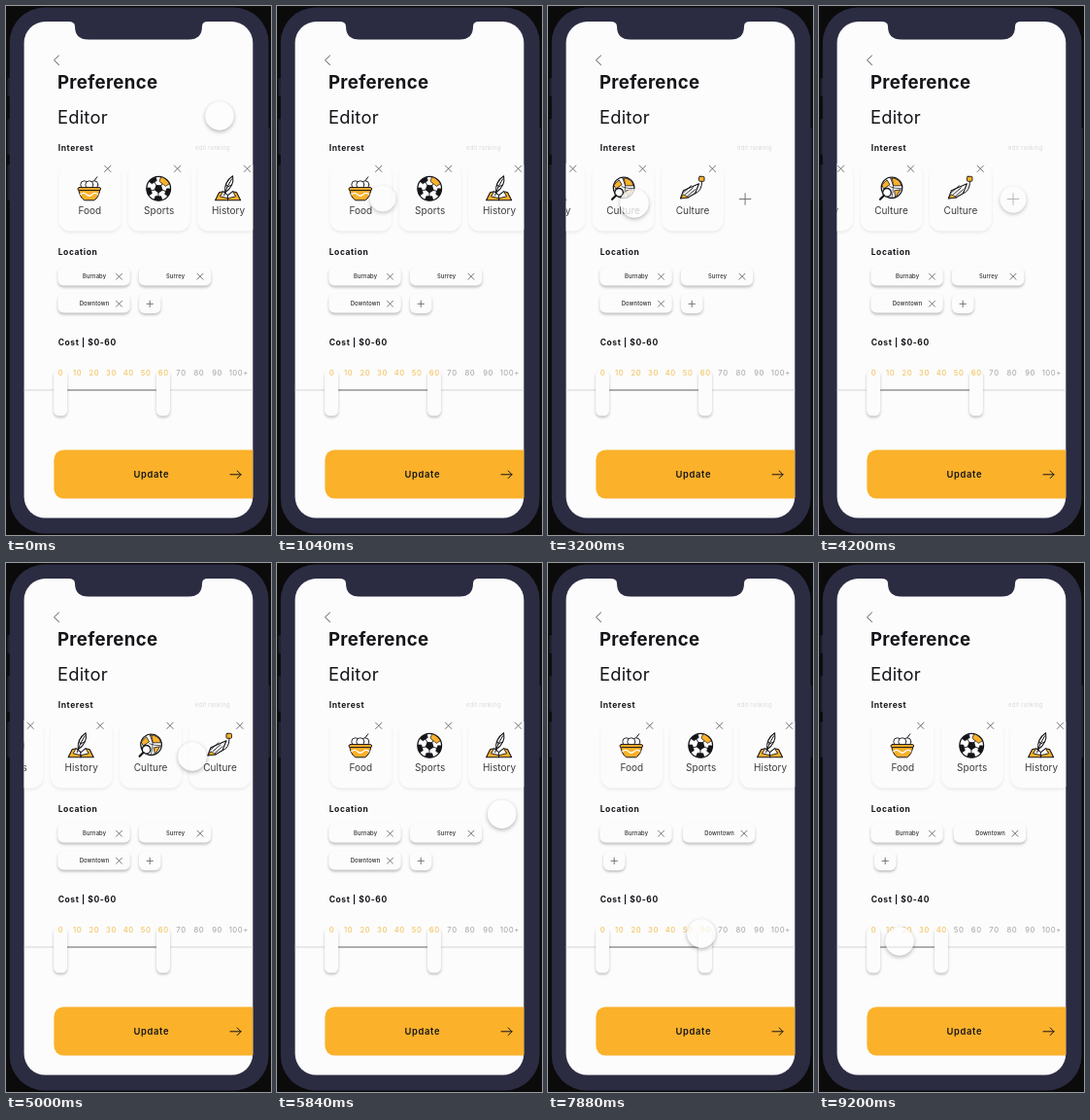
Write an HTML page with a canvas that moves like this. It is 273x544 px and loops after 9.24 s.

```html
<!DOCTYPE html>
<html lang="en">
<head>
<meta charset="utf-8">
<title>Preference editor</title>
<style>
html, body { margin: 0; width: 100%; height: 100%; overflow: hidden; background: #0b0b0c; }
canvas { display: block; width: 273px; height: 544px; }
</style>
</head>
<body>
<canvas id="stage"></canvas>
<script>
const W = 273, H = 544, LOOP = 9240, STEP = 40;
const INK = '#141419', ORANGE = '#fbb12a', BODY = '#2b2b42', PAPER = '#fcfcfc';
const canvas = document.getElementById('stage');
const c = canvas.getContext('2d');
const dpr = window.devicePixelRatio || 1;
canvas.width = W * dpr;
canvas.height = H * dpr;

const clamp = v => Math.max(0, Math.min(1, v));
const mix = (a, b, k) => a + (b - a) * k;
const ramp = (t, start, length) => {
  const v = clamp((t - start) / length);
  return v * v * (3 - 2 * v);
};

// Pointer stops and the time each is reached.
const STOPS = [
  { t: 0, x: 220, y: 113 },
  { t: 1000, x: 109, y: 198 },
  { t: 2300, x: 87, y: 203 },
  { t: 3900, x: 200, y: 199 },
  { t: 5800, x: 238, y: 254 },
  { t: 6400, x: 201, y: 279 },
  { t: 7800, x: 158, y: 381 },
  { t: 9160, x: 83, y: 389 }
];
const TRAVEL = 760;
const SWIPES = [1080, 2360, 4300];
const TAP = 6560, DRAG = 8400;

function pointerAt(t) {
  let { x, y } = STOPS[0];
  for (const stop of STOPS.slice(1)) {
    const k = ramp(t, stop.t - TRAVEL, TRAVEL);
    x = mix(x, stop.x, k);
    y = mix(y, stop.y, k);
  }
  for (const s of SWIPES) x -= 60 * Math.sin(Math.PI * ramp(t, s, 800));
  return { x, y };
}

const pressAt = t => Math.max(...[...SWIPES, TAP, DRAG].map(
  s => ramp(t, s - 240, 180) - ramp(t, s + 400, 180)));

const scrollAt = t =>
  -81 * ramp(t, 1080, 680) - 145 * ramp(t, 2360, 920) + 226 * ramp(t, 4700, 780);

function text(str, x, y, size, weight, color, spacing = 0, align = 'left') {
  c.font = `${weight} ${size}px Inter, sans-serif`;
  c.letterSpacing = spacing + 'px';
  c.textAlign = align;
  c.fillStyle = color;
  c.fillText(str, x + (align === 'center' ? spacing / 2 : 0), y);
}

function paint(path, fill, stroke, width = 1) {
  if (fill) { c.fillStyle = fill; c.fill(path); }
  if (stroke) { c.strokeStyle = stroke; c.lineWidth = width; c.stroke(path); }
}

const svg = (d, ...style) => paint(new Path2D(d), ...style);

function box(x, y, w, h, r, ...style) {
  const p = new Path2D();
  p.roundRect(x, y, w, h, r);
  paint(p, ...style);
}

function disc(x, y, r, ...style) {
  const p = new Path2D();
  p.arc(x, y, r, 0, Math.PI * 2);
  paint(p, ...style);
}

function polygon(x, y, r, sides, turn, ...style) {
  const p = new Path2D();
  for (let i = 0; i < sides; i++) {
    const a = turn + i * 2 * Math.PI / sides;
    p.lineTo(x + r * Math.cos(a), y + r * Math.sin(a));
  }
  p.closePath();
  paint(p, ...style);
}

function at(x, y, draw) {
  c.save();
  c.translate(x, y);
  draw();
  c.restore();
}

function shaded(alpha, blur, dy, draw) {
  c.save();
  c.shadowColor = `rgba(0,0,0,${alpha})`;
  c.shadowBlur = blur * dpr;
  c.shadowOffsetY = dy * dpr;
  draw();
  c.restore();
}

const cross = (x, y, r = 3.2) =>
  at(x, y, () => svg(`M${-r} ${-r}L${r} ${r}M${r} ${-r}L${-r} ${r}`, null, '#55555a', 0.8));
const plus = (x, y, r) =>
  at(x, y, () => svg(`M${-r} 0H${r}M0 ${-r}V${r}`, null, '#66666a', 0.9));

function foodIcon() {
  svg('M3 -5L8 -12', null, INK, 1);
  for (const x of [-5, 5, 0]) disc(x, -4, 4, '#fff', INK, 0.9);
  svg('M-11 1Q-10 9 -5 12H5Q10 9 11 1Z', ORANGE, INK, 1);
  box(-11.8, -1.2, 23.6, 3, 1.5, ORANGE, INK, 1);
  svg('M-9 6Q-6 3 -3 6T3 6T9 6', null, '#fff', 1.3);
}

function ballIcon() {
  c.save();
  disc(0, 0, 12.4, '#fff');
  const rim = new Path2D();
  rim.arc(0, 0, 12.4, 0, Math.PI * 2);
  c.clip(rim);
  for (let i = 0; i < 5; i++) {
    const a = -0.9 + i * 2 * Math.PI / 5, x = Math.cos(a), y = Math.sin(a);
    svg(`M${x * 4} ${y * 4}L${x * 8} ${y * 8}`, null, INK, 0.9);
    polygon(x * 12, y * 12, i ? 5 : 7, 5, a, i ? INK : ORANGE, INK, 0.7);
  }
  polygon(0, 0, 4.6, 5, -0.9, INK);
  c.restore();
  disc(0, 0, 12.4, null, INK, 1.2);
}

function historyIcon() {
  for (const side of [-1, 1]) {
    c.save();
    c.scale(side, 1);
    svg('M0 12L13 12L9 4L5 3L0 7Z', ORANGE, INK, 1.1);
    svg('M0 10L8 8L5 3L0 7Z', '#fff', INK, 0.9);
    c.restore();
  }
  svg('M-3 4Q-4 -7 5 -13Q7 -3 -3 4Z', '#fff', INK, 1.1);
  svg('M-4 7Q-1 -3 4 -10M0 -2L-2 -4M0 -2L4 -4', null, INK, 1);
}

function cultureIcon() {
  disc(1, -1, 10.8, '#fff', INK, 1.2);
  svg('M0 -11Q9 -11 11 -3L3 -3Z', ORANGE, INK, 0.8);
  svg('M-9 -4L-4 -9L-1 -4L-7 0Z', ORANGE, INK, 0.8);
  svg('M4 2L10 1L5 9Z', ORANGE, INK, 0.8);
  svg('M-1 -2Q4 0 11 0M1 -11Q4 -4 1 9', null, INK, 0.7);
  disc(-4, 4, 4.3, '#fff', INK, 1.3);
  svg('M-7 7L-11 11', null, INK, 2.2);
}

function craftIcon() {
  svg('M-12 10L-9 2L7 -5L3 5L-4 9Z', '#fff', INK, 1.1);
  for (let i = 0; i < 3; i++)
    svg(`M${2 * i - 9} ${2 * i + 4}l8 -7`, null, INK, 0.9);
  svg('M-12 10L-9 6L-4 9Z', ORANGE, INK, 0.8);
  svg('M3 5Q10 3 10 -7', null, INK, 1);
  box(7, -12.5, 5.5, 5, 1, ORANGE, INK, 0.9);
}

const CARDS = Object.entries({
  'Food': foodIcon, 'Sports': ballIcon, 'History': historyIcon,
  'Culture': cultureIcon, 'Culture ': craftIcon
});

function interests(scroll) {
  at(scroll, 0, () => {
    CARDS.forEach(([name, icon], i) => {
      const x = 86.3 + 71.4 * i;
      shaded(0.075, 3, 1.8, () => box(x - 32, 162, 64, 69.5, 12, PAPER));
      at(x - 0.5, 187.8, icon);
      cross(104.7 + 71.9 * i, 167.3);
      text(name.trim(), x, 214.2, 10, 400, '#3c3c40', 0.05, 'center');
    });
    plus(426, 198.5, 5.8);
  });
}

const pad = (x, y, w, h, r) =>
  shaded(0.24, 2.8, 1.8, () => box(x, y, w, h, r, PAPER));

function chip(name, x, y) {
  pad(x, y, 74.5, 19.6, 6);
  text(name, x + 37.7, y + 12, 5.8, 500, '#2d2d30', 0.16, 'center');
  cross(x + 63.2, y + 10.2, 3);
}

function locations(t) {
  const k = ramp(t, TAP, 320);
  chip('Burnaby', 53.3, 268);
  c.globalAlpha = 1 - k;
  chip('Surrey', 136.8, 268);
  c.globalAlpha = 1;
  chip('Downtown', mix(53.3, 138.8, k), mix(296, 268, k));
  const x = mix(137, 57, k);
  pad(x, 296, 22.5, 20, 6);
  plus(x + 11.2, 306.3, 3.2);
}

const tickX = i => 56.1 + 17.1 * i + 0.09 * i * i;

function costs(t) {
  const k = ramp(t, DRAG, 400);
  const knob = mix(tickX(6), tickX(4), k);
  const limit = k > 0.5 ? 4 : 6;
  heading(`Cost | $0-${limit * 10}`, 349.2);
  svg('M18 395H255', null, '#cfcfd0', 0.9);
  svg(`M60 395H${knob}`, null, '#77777a', 1.1);
  for (const x of [tickX(0), knob]) pad(x - 7, 374, 14, 47.5, 5.5);
  for (let i = 0; i <= 10; i++) {
    const label = i < 10 ? `${i * 10}` : '100+';
    const x = tickX(i) + Math.max(0, label.length - 2) * 1.7;
    text(label, x, 380.2, 7.6, 500, i <= limit ? '#f3c566' : '#aeaeb1', 0.55, 'center');
  }
}

const heading = (str, y) => text(str, 53.7, y, 8.5, 700, INK, 0.58);

function updateButton() {
  box(49.4, 456.4, 225, 50.2, 10, ORANGE);
  text('Update', 149.5, 485.2, 9.4, 600, INK, 0.65, 'center');
  svg('M231 481.8H242M238.2 478L242 481.8L238.2 485.6', null, INK, 1);
}

function pointer(t) {
  const { x, y } = pointerAt(t), press = pressAt(t);
  const r = mix(14.6, 13.2, press);
  // The shadow stays outside the disc so content shows through it.
  c.save();
  c.beginPath();
  c.rect(0, 0, W, H);
  c.arc(x, y, r, 0, Math.PI * 2);
  c.clip('evenodd');
  shaded(mix(0.3, 0.24, press), 4, 1.6, () => disc(x, y, r, '#fff'));
  c.restore();
  disc(x, y, r, `rgba(253,253,253,${mix(0.78, 0.45, press)})`);
}

function phone() {
  c.fillStyle = '#0b0b0c';
  c.fillRect(0, 0, W, H);
  const key = (x, y, h) => box(x, y, 5, h, 1.5, '#20202f');
  key(1.5, 74, 19);
  key(1.5, 116, 37);
  key(1.5, 163, 37);
  key(267, 125, 75);
  box(3.8, 1.5, 266.7, 541, 36, BODY);
}

function render(t) {
  c.setTransform(dpr, 0, 0, dpr, 0, 0);
  c.lineCap = c.lineJoin = 'round';
  phone();
  c.save();
  c.beginPath();
  c.roundRect(18.6, 16, 235.7, 510.6, 22);
  c.clip();
  c.fillStyle = PAPER;
  c.fillRect(0, 0, W, H);
  svg('M54.5 51L49.5 55.8L54.5 60.6', null, '#55555a', 1);
  text('Preference', 53, 85.2, 18.6, 700, INK, 0.32);
  text('Editor', 53, 121.2, 18.4, 400, INK, 0.2);
  text('edit ranking', 195, 148.3, 5.8, 400, '#d9d9db', 0.3);
  heading('Interest', 149);
  heading('Location', 255.6);
  interests(scrollAt(t));
  locations(t);
  costs(t);
  updateButton();
  c.restore();
  svg('M64 15H208V16Q202 16 202 21Q202 34.5 188 34.5H85Q71 34.5 71 21Q71 16 64 16Z', BODY);
  pointer(t);
}

function frame() {
  const t = performance.now() % LOOP;
  render(Math.floor(t / STEP) * STEP);
  requestAnimationFrame(frame);
}
frame();
</script>
</body>
</html>
```
